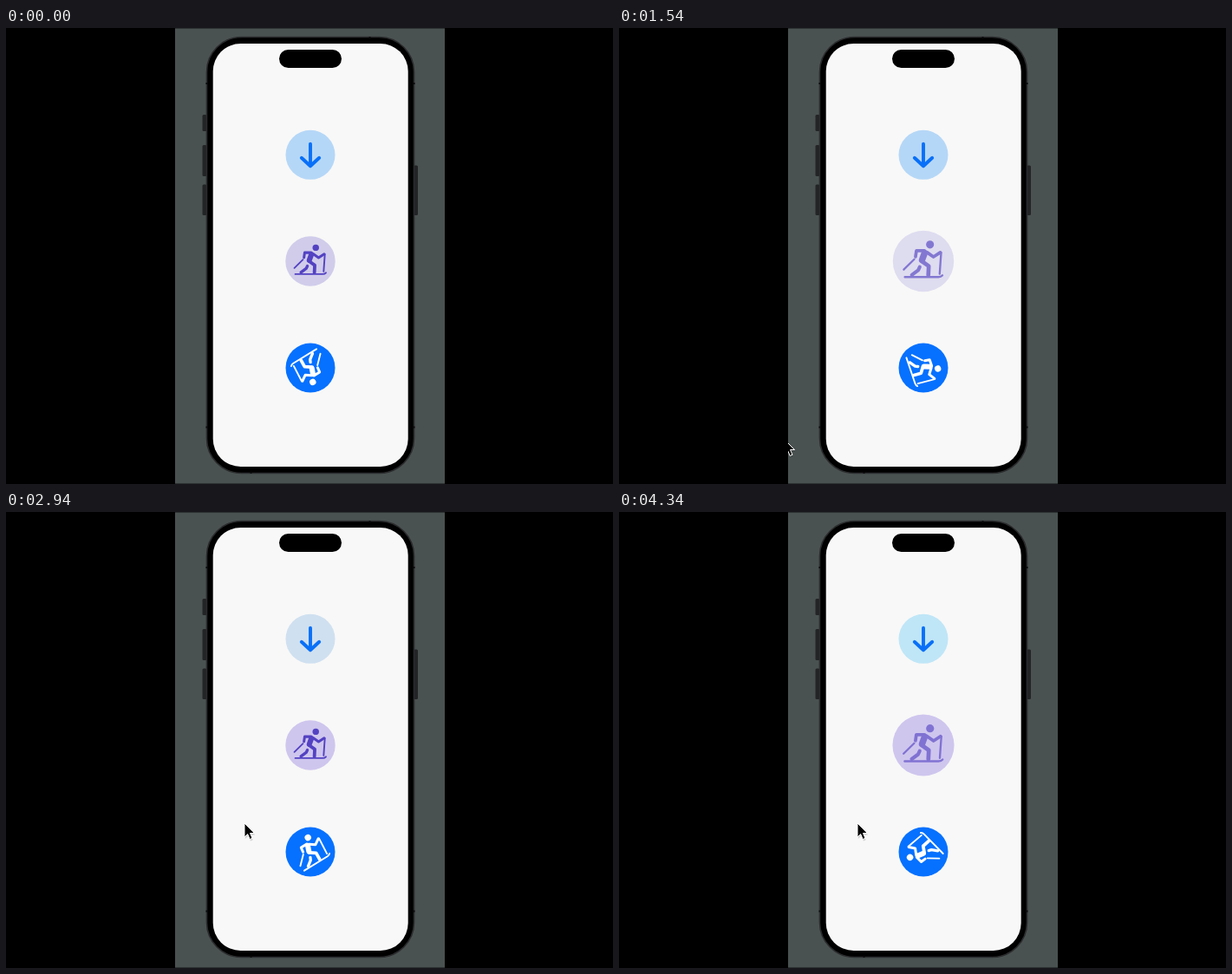
These frames come from a looping animation (700 by 526 pixels, 5340 ms). An HTML page:

```html
<!DOCTYPE html>
<html lang="en">
<head>
<meta charset="utf-8">
<title>Icon effects</title>
<style>
html, body { margin: 0; height: 100%; overflow: hidden; background: #000; }
svg { display: block; width: 700px; height: 526px; }
</style>
</head>
<body>
<svg viewBox="0 0 700 526">
  <defs>
    <clipPath id="panel"><path d="M195 0H506V526H195Z"/></clipPath>
    <g id="skier" fill="none" stroke="currentColor" stroke-linecap="round" stroke-linejoin="round">
      <circle cx="6.2" cy="-15.5" r="3.7" fill="currentColor" stroke="none"/>
      <path stroke-width="1.9" d="M-17.3 14.8H14Q16.5 14.8 17.8 13.2M16.6-8 15.2 11.8M-18.3 7.8-8.5-1.8"/>
      <path stroke-width="3" d="M1-9.8H-6.5L-7.3-4.2M3.5-8.2 9.4-4 15.8-8.2"/>
      <path stroke-width="6" d="M1.2-7.8-1.2-1.2"/>
      <path stroke-width="3.8" d="M-1.5 0 5 4.6 4.6 13"/>
      <path stroke-width="3.3" d="M-3.4 5.4-4.8 8.4-10.8 12.8"/>
    </g>
  </defs>

  <path fill="#4a5251" d="M195 0H506V526H195Z"/>
  <path stroke="#2c3231" d="M195 .5H506M195 525.5H506"/>

  <g fill="#232426">
    <rect x="226.5" y="100" width="5" height="19" rx="1.5"/>
    <rect x="226.5" y="135" width="5" height="36" rx="1.5"/>
    <rect x="226.5" y="180.500" width="5" height="35.500" rx="1.5"/>
    <rect x="470" y="158.500" width="5" height="57.500" rx="1.5"/>
  </g>
  <rect x="231.500" y="10.500" width="239" height="503" rx="40" stroke="#2a2b2d" stroke-width="1.6"/>
  <path stroke="#0b0b0c" stroke-width="2" d="M230.500 64H233M469 64H471.500M230.500 460.500H233M469 460.500H471.500M419.500 10V12M282.500 512V514"/>
  <rect x="238.700" y="18" width="225" height="488" rx="32" fill="#f8f8f8"/>
  <rect x="315" y="25" width="72" height="21" rx="10.500"/>

  <circle id="disc" cx="351" cy="146.300" r="28.500"/>
  <path fill="none" stroke="#0870f8" stroke-width="3.900" stroke-linecap="round" stroke-linejoin="round"
    d="M351 133.800V159M340.800 149.800 351 159.300 361.200 149.800"/>

  <g id="pulse">
    <circle id="halo" r="28.500"/>
    <g id="ghost"><use href="#skier" color="#5241c2"/></g>
  </g>

  <circle cx="351" cy="392" r="28.500" fill="#0671ff"/>
  <use id="spin" href="#skier" color="#fff"/>

  <g clip-path="url(#panel)">
    <g id="cursor">
      <path fill="#000" opacity=".15" transform="translate(.8 2)" d="M0 0V16L3.700 12.600 6.200 18.500 9 17.300 6.500 11.500H11.500Z"/>
      <path stroke="#fff" d="M0 0V16L3.700 12.600 6.200 18.500 9 17.300 6.500 11.500H11.500Z"/>
    </g>
  </g>
</svg>
<script>
const LOOP = 5340, STEP = 140, LAST = 31, FPS = 7;
const el = id => document.getElementById(id);
const set = (id, name, value) => el(id).setAttribute(name, value);
const clamp = x => Math.max(0, Math.min(1, x));

// Colour stops: [step, r, g, b]
const discTint = [[0, 181, 215, 247], [17, 181, 215, 247], [21, 207, 224, 240], [24, 214, 230, 245], [31, 191, 230, 247]];
const haloTint = [[0, 208, 204, 234], [4, 207, 198, 238], [11, 222, 220, 239], [17, 207, 198, 238],
  [21, 207, 198, 238], [24, 211, 206, 240], [31, 207, 198, 238]];

function tint(stops, k) {
  const i = Math.max(1, stops.findIndex(s => s[0] >= k));
  const [a, b] = [stops[i - 1], stops[i]];
  const u = (k - a[0]) / (b[0] - a[0]);
  return `rgb(${[1, 2, 3].map(c => Math.round(a[c] + (b[c] - a[c]) * u))})`;
}

function draw(now) {
  const k = Math.min(LAST, Math.floor(now % LOOP / STEP));
  const sec = k / FPS;

  const swell = .5 - .5 * Math.cos((sec + .16) / 3 * 2 * Math.PI);
  set('pulse', 'transform', `translate(351 269) scale(${1 + .25 * swell})`);
  set('ghost', 'opacity', 1 - .38 * swell);
  set('spin', 'transform', `translate(351 392) rotate(${148.5 + 180 * sec})`);
  set('disc', 'fill', tint(discTint, k));
  set('halo', 'fill', tint(haloTint, k));

  const left = (1 - clamp((k - 11) / 5)) ** 2;
  set('cursor', 'transform', `translate(${275 - 84 * left} ${359 + 116 * left})`);
  set('cursor', 'visibility', k < 11 ? 'hidden' : 'visible');
}

const start = performance.now();
function tick() {
  draw(performance.now() - start);
  requestAnimationFrame(tick);
}
tick();
</script>
</body>
</html>
```
